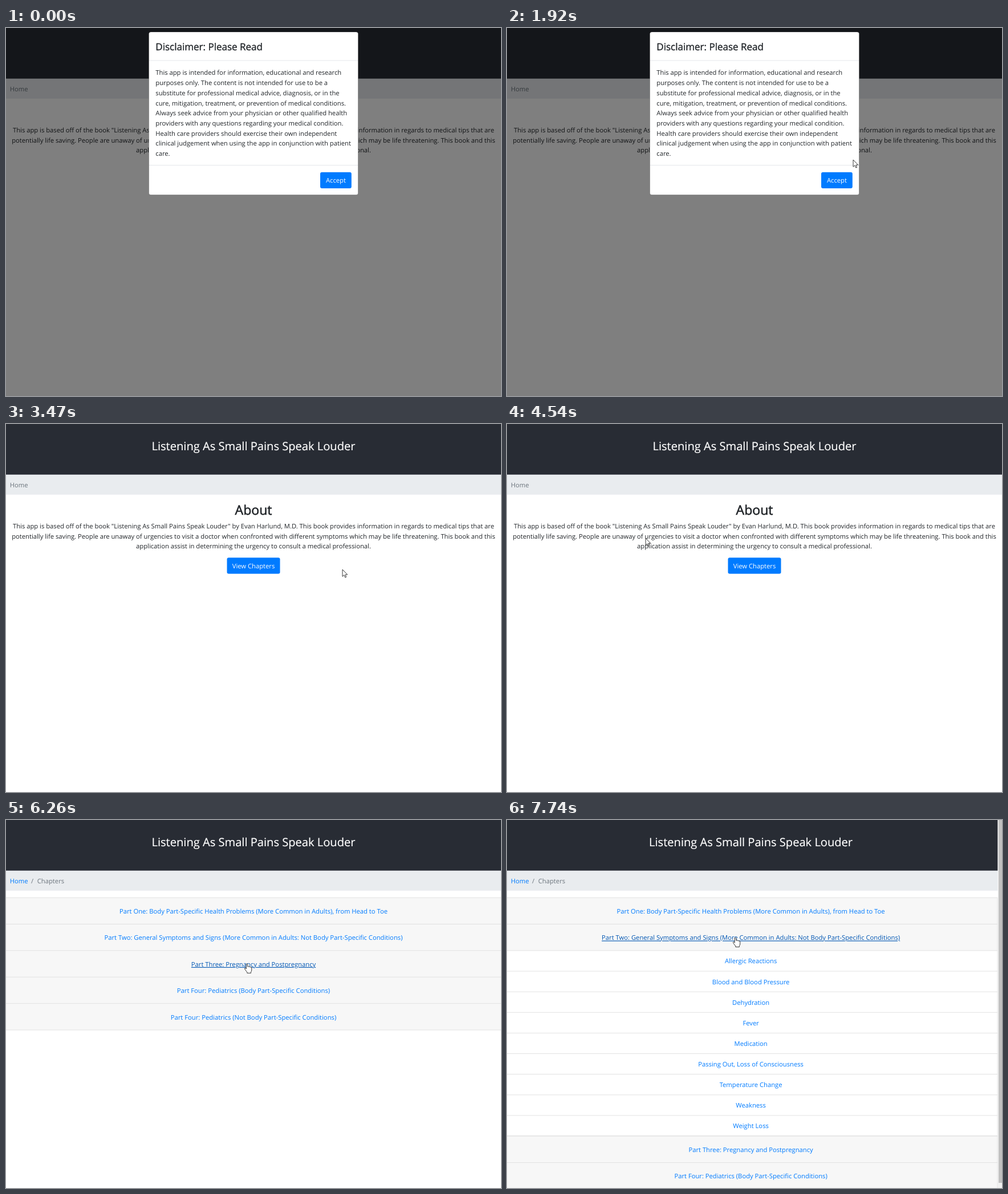
These frames come from a looping animation (868 by 645 pixels, 8000 ms). An HTML page:

```html
<!DOCTYPE html>
<html lang="en">
<head>
<meta charset="utf-8">
<title>Health guide walkthrough</title>
<style>
  html, body { margin: 0; width: 100%; height: 100%; overflow: hidden; background: #fff; }
  svg { display: block; width: 868px; height: 645px; }
  text { font: 11.23px "Open Sans", "Noto Sans", sans-serif; fill: #212529; text-rendering: geometricPrecision; }
  .mid { text-anchor: middle; }
  .link { fill: #007bff; }
  .muted { fill: #6c757d; }
  .on { fill: #0056b3; text-decoration: underline; }
  text.white { fill: #fff; }
  text.book { font-size: 20.1px; stroke: #fff; stroke-width: .2; }
  text.about { font-size: 23px; stroke: #212529; stroke-width: .6; }
  text.notice { font-size: 17px; stroke: #212529; stroke-width: .35; }
</style>
</head>
<body>
<svg id="stage" viewBox="0 0 868 645" xmlns="http://www.w3.org/2000/svg"></svg>
<script>
const LOOP = 8000, MID = 434, SCROLL_MID = 427.6, LEAD = 17.7;
const BOOK = "Listening As Small Pains Speak Louder";
const ABOUT = [
  `This app is based off of the book "${BOOK}" by Evan Harlund, M.D. This book provides information in regards to medical tips that are`,
  "potentially life saving. People are unaway of urgencies to visit a doctor when confronted with different symptoms which may be life threatening. This book and this",
  "application assist in determining the urgency to consult a medical professional."
];
const NOTICE = [
  "This app is intended for information, educational and research",
  "purposes only. The content is not intended for use to be a",
  "substitute for professional medical advice, diagnosis, or in the",
  "cure, mitigation, treatment, or prevention of medical conditions.",
  "Always seek advice from your physician or other qualified health",
  "providers with any questions regarding your medical condition.",
  "Health care providers should exercise their own independent",
  "clinical judgement when using the app in conjunction with patient",
  "care."
];
const PARTS = [
  "Part One: Body Part-Specific Health Problems (More Common in Adults), from Head to Toe",
  "Part Two: General Symptoms and Signs (More Common in Adults: Not Body Part-Specific Conditions)",
  "Part Three: Pregnancy and Postpregnancy",
  "Part Four: Pediatrics (Body Part-Specific Conditions)",
  "Part Four: Pediatrics (Not Body Part-Specific Conditions)"
];
const TOPICS = ["Allergic Reactions", "Blood and Blood Pressure", "Dehydration", "Fever", "Medication",
  "Passing Out, Loss of Consciousness", "Temperature Change", "Weakness", "Weight Loss"];

const text = (x, y, s, cls = "") => `<text x="${x}" y="${y}" class="${cls}">${s}</text>`;
const rect = (x, y, w, h, fill, more = "") => `<rect x="${x}" y="${y}" width="${w}" height="${h}" fill="${fill}" ${more}/>`;
const group = (id, body) => `<g id="${id}">${body}</g>`;
const rule = (y, w) => rect(0, y, w, 0.9, "#dfdfdf");

const header = (cx, w, crumbs) =>
  rect(0, 88, w, 35.8, "#e9ecef") + rect(0, 0, w, 88.7, "#282c34") +
  text(cx, 45.5, BOOK, "mid white book") + crumbs;

const button = (id, x, y, w, label) => group(id,
  rect(x - 1.2, y - 1.2, w + 2.4, 30.6, "none", 'rx="3.6" stroke="#80bdff" stroke-width="2.4" class="ring"') +
  rect(x, y, w, 28.2, "#007bff", 'rx="3" class="face"') +
  text(x + w / 2, y + 18.5, label, "mid white"));

const crumbs = text(6.8, 110.6, "Home", "link") + text(44, 110.6, "/", "muted") + text(54.8, 110.6, "Chapters", "muted");

const partRow = (cx, w, y, label) =>
  rect(0, y, w, 46.4, "#f7f7f7") + rule(y - 0.4, w) + text(cx, y + 28, label, "mid link part");

function chapters(open) {
  const cx = open ? SCROLL_MID : MID, w = open ? 860.6 : 868;
  let y = 136, out = header(cx, w, crumbs);
  PARTS.forEach((label, i) => {
    out += partRow(cx, w, y, label);
    y += 46.4;
    if (open && i === 1) {
      TOPICS.forEach(name => {
        out += rule(y - 0.4, w) + text(cx, y + 22.6, name, "mid link");
        y += 36.13;
      });
      out += rule(y - 1.1, w);
    }
  });
  out += rule(y - 0.4, w);
  if (open) out += rect(859.6, 137, 0.9, 508, "#dfdfdf") +
    rect(860.6, 0, 7.4, 645, "#f1f1f1") + rect(862, 0, 6, 636, "#c1c1c1");
  return out;
}

const home = header(MID, 868, text(6.8, 110.6, "Home", "muted")) +
  text(MID, 159.2, "About", "mid about") +
  ABOUT.map((s, i) => text(MID, 183 + i * LEAD, s, "mid")).join("") +
  button("view", 387.5, 234.3, 93, "View Chapters");

const modal = rect(0, 0, 868, 645, "#000", 'opacity=".5"') +
  rect(250.5, 7, 367, 285.6, "#fff", 'rx="3.5" stroke="#000" stroke-opacity=".3" stroke-width=".8"') +
  rect(251, 56.6, 366, 0.8, "#dee2e6") + rect(251, 240, 366, 0.8, "#dee2e6") +
  text(262.3, 39, "Disclaimer: Please Read", "notice") +
  NOTICE.map((s, i) => text(262.3, 82.4 + i * LEAD, s)).join("") +
  button("accept", 551, 252.8, 54.8, "Accept");

const stage = document.getElementById("stage");
stage.innerHTML = rect(0, 0, 868, 645, "#fff") +
  group("home", home) + group("modal", modal) +
  group("closed", chapters(false)) + group("open", chapters(true)) +
  '<circle id="press" r="8.6" fill="#f5e614" fill-opacity=".62"/>' +
  group("cursor",
    '<path id="arrow" d="M0 0V12.3L2.9 9.7 4.8 14 6.7 13.2 4.9 9H8.7Z" fill="#fff" stroke="#222" stroke-width=".9"/>' +
    '<path id="hand" d="M-.8 1.5q1.3-2 2.6 0v4.2q1.4-.8 2.4.3q1.5-.6 2.2.5q2-.4 2.3 1.2v4q0 2-1.3 3.4v1.9h-6.6v-1.5l-4.2-5.6q-.6-1.8 1.1-1.8l1.5 1.6z" fill="#fff" stroke="#222" stroke-width=".9"/>');

const el = id => document.getElementById(id);
const show = (node, on) => node.setAttribute("visibility", on ? "inherit" : "hidden");

// Pointer moves: first step, last step, step count, points after the previous rest
const START = [684, 627];
const MOVES = [
  [360, 1130, 11, [[560, 510], [360, 390], [194, 302]]],
  [1210, 1920, 10, [[320, 215], [470, 182], [607, 231]]],
  [1990, 1990, 1, [[609, 236.5]]],
  [2070, 2150, 2, [[595, 250.5]]],
  [2300, 2380, 2, [[590, 255]]],
  [3620, 4000, 6, [[470, 247]]],
  [4230, 5010, 11, [[340, 190], [234, 204], [290, 224], [365, 230]]],
  [5100, 5320, 4, [[424.5, 259.5]]],
  [6190, 6720, 8, [[395, 162]]],
  [6890, 6960, 2, [[391, 187]]],
  [7040, 7190, 3, [[400, 205.5]]]
];

function along(pts, u) {
  const n = pts.length - 1, i = Math.min(n - 1, Math.floor(u * n)), f = u * n - i;
  const at = k => pts[Math.max(0, Math.min(n, k))];
  return [0, 1].map(c => {
    const a = at(i - 1)[c], b = at(i)[c], d = at(i + 1)[c], e = at(i + 2)[c];
    return b + f * ((d - a) + f * ((2 * a - 5 * b + 4 * d - e) + f * (3 * b - a - 3 * d + e))) / 2;
  });
}

function pointer(t) {
  let from = START;
  for (const [t0, t1, n, pts] of MOVES) {
    if (t < t0) break;
    const step = n > 1 ? Math.min(n - 1, Math.floor((t - t0) / ((t1 - t0) / (n - 1)) + 0.05)) : 0;
    if (step < n - 1) return along([from, ...pts], (step + (t0 === 360 ? 0 : 1)) / n);
    from = pts[pts.length - 1];
  }
  return from;
}

const inside = ([x, y], l, t, w, h) => x >= l && x <= l + w && y >= t && y <= t + h;

function paint(id, hover, active) {
  el(id).querySelector(".face").setAttribute("fill", active ? "#0062cc" : hover ? "#0069d9" : "#007bff");
  show(el(id).querySelector(".ring"), active);
}

function hoverParts(id, p, live) {
  let hit = false;
  el(id).querySelectorAll(".part").forEach(node => {
    const w = node.getComputedTextLength() + 18;
    const over = live && inside(p, node.getAttribute("x") - w / 2, node.getAttribute("y") - 18, w, 28);
    node.classList.toggle("on", over);
    hit = hit || over;
  });
  return hit;
}

function draw(t) {
  const page = t < 3470 ? "modal" : t < 5870 ? "home" : t < 7740 ? "closed" : "open";
  const p = pointer(t);
  const pressed = (t >= 3300 && t < 3470) || (t >= 5700 && t < 5870) || (t >= 7670 && t < 7740);
  show(el("home"), page === "home" || page === "modal");
  for (const id of ["modal", "closed", "open"]) show(el(id), page === id);

  const onAccept = page === "modal" && inside(p, 551, 253, 55, 28);
  const onView = page === "home" && inside(p, 387.5, 234.3, 93, 28);
  paint("accept", onAccept, onAccept && pressed);
  paint("view", onView, onView && pressed);
  const onPart = [hoverParts("closed", p, page === "closed" && t >= 5940), hoverParts("open", p, page === "open")].some(Boolean);

  const hand = onAccept || onView || onPart;
  show(el("cursor"), t >= 360);
  show(el("arrow"), !hand);
  show(el("hand"), hand);
  el("cursor").setAttribute("transform", `translate(${p[0]} ${p[1]})`);
  el("press").setAttribute("cx", p[0]);
  el("press").setAttribute("cy", p[1]);
  show(el("press"), pressed);
}

const began = performance.now();
function tick() {
  draw((performance.now() - began) % LOOP);
  requestAnimationFrame(tick);
}
tick();
</script>
</body>
</html>
```
